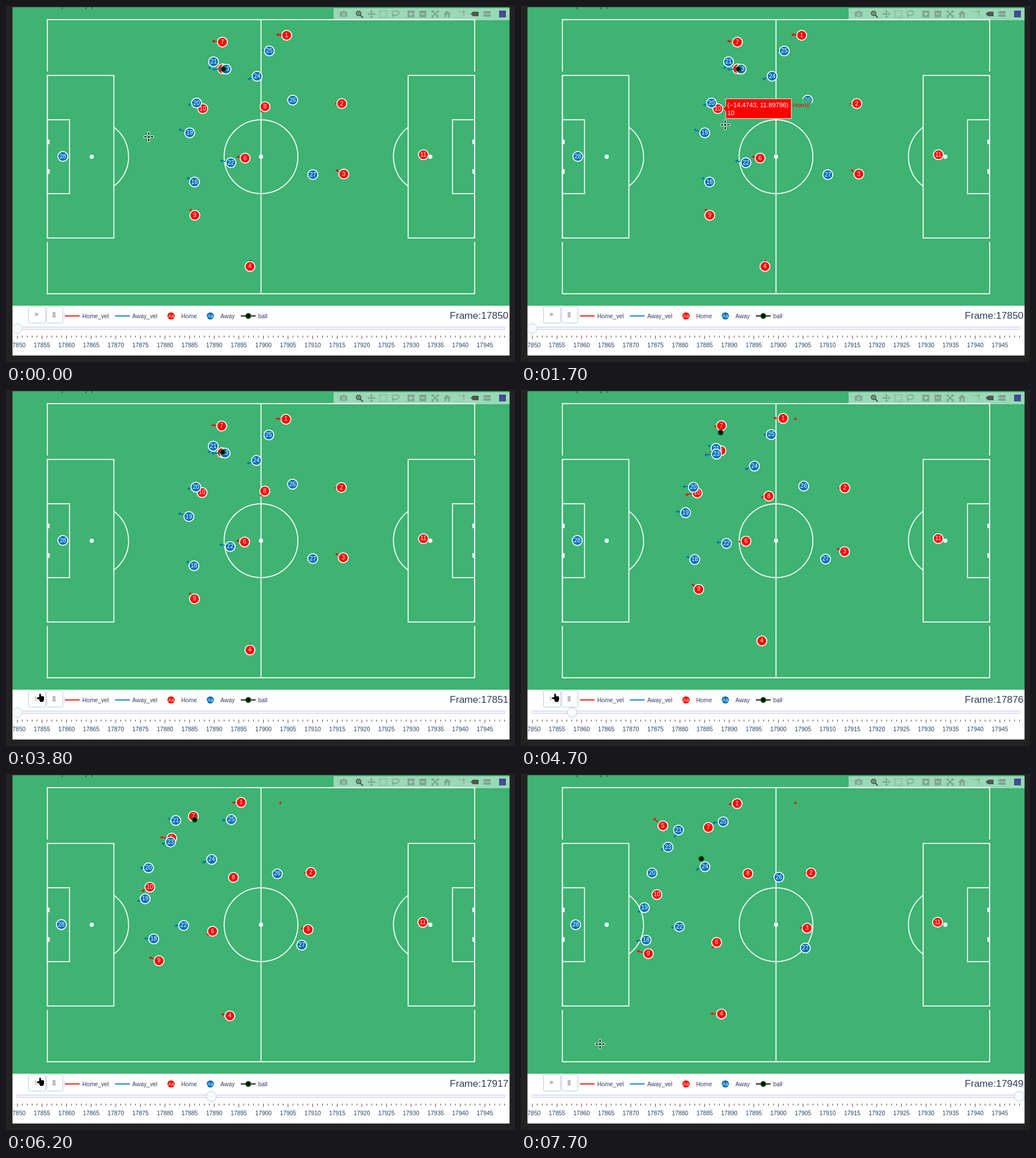
These frames come from a looping animation (895 by 626 pixels, 8000 ms). An HTML page with a canvas:

```html
<!DOCTYPE html>
<html lang="en">
<head>
<meta charset="utf-8">
<title>Match tracking</title>
<style>
html, body { margin: 0; width: 100%; height: 100%; overflow: hidden; background: #222; }
canvas { display: block; width: 895px; height: 626px; }
</style>
</head>
<body>
<canvas id="stage" width="895" height="626"></canvas>
<script>
const ctx = document.getElementById('stage').getContext('2d');
const LOOP = 8000, FIRST = 17850, SPAN = 99;
const RED = '#f00', BLUE = '#0070b9', GREEN = '#3eb372', INK = '#2a3f5f', RIM = '#bec8d9';
const FONT = '"Liberation Sans", Arial, sans-serif';
const LEFT = 11.4, WIDTH = 874, MID_X = 448.4, MID_Y = 265, METRE = 7.089;
const SIDES = [[1, 0], [-1, 0], [0, 1], [0, -1]];

// Each run is a polynomial through a few x, y points evenly spaced in time
const home = [
  [493.5, 51.5, 433, 49.5, 380, 52],
  [590.5, 171.5, 510, 174],
  [594, 295.5, 547, 277, 503, 271],
  [429, 458, 409.5, 430.5, 352.5, 422],
  [381, 110.5, 342, 108, 293, 113, 249.5, 91],
  [420.5, 267.5, 376, 270, 344, 296],
  [380.5, 63.5, 336, 67.5, 329.5, 94],
  [455.5, 177, 429, 187, 400.5, 182, 399, 175],
  [332, 368, 289.5, 337, 224, 316],
  [346, 180.5, 299, 183, 254, 198.5, 239, 212],
  [734, 261.5, 732.5, 260.5]
];
const away = [
  [331.5, 309.5, 280, 292, 220, 292],
  [323, 223, 262.5, 215.5, 217, 235],
  [335, 170.5, 293.5, 170, 251.5, 165, 230.5, 174],
  [365, 98, 335.5, 99.5, 299.5, 82, 277, 98.5],
  [395.5, 275.5, 332.5, 267, 278.5, 268.5],
  [387, 111, 310.5, 116, 258.5, 128.5],
  [441.5, 123.5, 323.5, 163],
  [463, 79, 416, 79, 355.5, 84],
  [504, 165.5, 487, 172.5, 453.5, 181.5],
  [539.5, 296.5, 528, 299, 500, 306],
  [100, 264.5, 96, 265]
];
const ball = [382.5, 111, 346, 70, 332, 79, 317, 149];

// Timelines: [ms, value...]
const knobKeys = [[3800, 20], [4700, 90], [5500, 221], [6200, 361], [7500, 865], [7700, 876]];
const cursorKeys = [[200, 251, 230], [1100, 355, 188], [1300, 357, 197], [1600, 357, 197],
  [1700, 359, 209], [1900, 406, 257], [2300, 284, 344], [2400, 318, 318], [2800, 318, 318],
  [3300, 60, 541], [6500, 60, 541], [6700, 83, 445], [7700, 139, 475]];
const hovers = [[0], [600, 19, '(−17.7431, 5.91327)'], [900, 10, '(−14.4743, 11.89796)'], [1800],
  [1900, 6, '(−3.91752, −0.34619)'], [2100], [2300, 18, '(−16.5463, −6.24873)'], [2900]];

function at(keys, t, col = 1) {
  const i = keys.findIndex(k => k[0] >= t);
  if (i < 0) return keys[keys.length - 1][col];
  if (i === 0) return keys[0][col];
  const a = keys[i - 1], b = keys[i];
  return a[col] + (b[col] - a[col]) * (t - a[0]) / (b[0] - a[0]);
}

function place(path, f) {
  const n = path.length / 2, s = f / SPAN * (n - 1);
  let x = 0, y = 0;
  for (let i = 0; i < n; i++) {
    let w = 1;
    for (let j = 0; j < n; j++) if (j !== i) w *= (s - j) / (i - j);
    x += w * path[2 * i];
    y += w * path[2 * i + 1];
  }
  return { x, y };
}

function box(x, y, w, h, fill) {
  ctx.fillStyle = fill;
  ctx.fillRect(x, y, w, h);
}

function text(s, x, y, size = 10.4, fill = INK, align = 'left') {
  ctx.font = size + 'px ' + FONT;
  ctx.fillStyle = fill;
  ctx.textAlign = align;
  ctx.fillText(s, x, y);
}

function line(color, width, ...pts) {
  ctx.strokeStyle = color;
  ctx.lineWidth = width;
  ctx.beginPath();
  for (let i = 0; i < pts.length; i += 2) ctx.lineTo(pts[i], pts[i + 1]);
  ctx.stroke();
}

function poly(fill, ...pts) {
  ctx.fillStyle = fill;
  ctx.beginPath();
  for (let i = 0; i < pts.length; i += 2) ctx.lineTo(pts[i], pts[i + 1]);
  ctx.closePath();
  ctx.fill();
}

function disc(x, y, r, fill, rim, width) {
  ctx.beginPath();
  ctx.arc(x, y, r, 0, 7);
  ctx.fillStyle = fill;
  ctx.fill();
  if (!rim) return;
  ctx.strokeStyle = rim;
  ctx.lineWidth = width;
  ctx.stroke();
}

function arc(x, y, r, from, to) {
  ctx.beginPath();
  ctx.arc(x, y, r, from, to);
  ctx.stroke();
}

function panel(x, y, w, h, fill) {
  ctx.beginPath();
  ctx.roundRect(x, y, w, h, 2);
  ctx.fillStyle = fill;
  ctx.fill();
  ctx.strokeStyle = RIM;
  ctx.lineWidth = 1;
  ctx.stroke();
}

function pitch() {
  box(0, 0, 895, 626, '#222');
  box(LEFT, 2, WIDTH, 525, GREEN);
  text('[', 97, 2, 12, '#1c3330');
  text(']', 139, 2, 12, '#1c3330');
  text('p', 150, 2, 12, '#1c3330');

  const halfW = 53 * METRE, halfH = 34 * METRE, ring = 9.15 * METRE;
  ctx.strokeStyle = '#fff';
  ctx.lineWidth = 1.75;
  ctx.strokeRect(MID_X - halfW, MID_Y - halfH, 2 * halfW, 2 * halfH);
  line('#fff', 1.75, MID_X, MID_Y - halfH, MID_X, MID_Y + halfH);
  arc(MID_X, MID_Y, ring, 0, 7);
  disc(MID_X, MID_Y, 3.7, '#fff');
  const bend = Math.acos(5.5 / 9.15);
  [1, -1].forEach(s => {
    const x = MID_X - s * halfW, spot = x + 11 * METRE * s, turn = s > 0 ? 0 : Math.PI;
    [-1, 1].forEach(v => box(x - 1.5, MID_Y + v * 146.5 - 3.2, 3, 6.4, GREEN));
    [[16.5, 40.32], [5.5, 18.32]].forEach(([w, h]) =>
      ctx.strokeRect(x, MID_Y - h / 2 * METRE, w * METRE * s, h * METRE));
    arc(spot, MID_Y, ring, turn - bend, turn + bend);
    disc(spot, MID_Y, 3.7, '#fff');
    [-1, 1].forEach(v => box(s > 0 ? x : x - 4, MID_Y + v * 26 - 4, 4, 8, '#fff'));
  });
}

function toolbar() {
  box(576, 4, LEFT + WIDTH - 576, 21, 'rgba(255,255,255,.48)');
  const dim = 'rgba(68,68,68,.34)', lit = 'rgba(60,60,60,.82)', pale = '#a4dcbd', y = 14;
  // camera
  box(587, 10, 13, 9, dim);
  box(591, 8.5, 5, 1.5, dim);
  disc(593.5, 14.5, 2.8, pale);
  disc(593.5, 14.5, 1.6, dim);
  // zoom
  disc(620, 13, 3.8, 'transparent', lit, 2);
  line(lit, 2.4, 623, 16, 627.5, 20.5);
  line(lit, 1.2, 618, 13, 622, 13);
  line(lit, 1.2, 620, 11, 620, 15);
  // pan
  SIDES.forEach(([a, b]) => {
    line(dim, 1.6, 642.5, y, 642.5 + 5 * a, y + 5 * b);
    poly(dim, 642.5 + 7 * a, y + 7 * b,
      642.5 + 4 * a - 2.6 * b, y + 4 * b + 2.6 * a,
      642.5 + 4 * a + 2.6 * b, y + 4 * b - 2.6 * a);
  });
  // box select
  ctx.setLineDash([2, 1.7]);
  ctx.strokeStyle = dim;
  ctx.strokeRect(657.5, 8.5, 12, 11.5);
  ctx.setLineDash([]);
  // lasso
  ctx.beginPath();
  ctx.ellipse(684.8, 12.5, 6, 4, -.15, 0, 7);
  ctx.stroke();
  line(dim, 1.5, 681, 15.5, 679.5, 18, 682, 20);
  // zoom in, zoom out
  [712, 733].forEach((x, i) => {
    box(x - 6, 8, 12, 12, dim);
    line(pale, 1.8, x - 3.5, y, x + 3.5, y);
    if (!i) line(pale, 1.8, x, 10.5, x, 17.5);
  });
  // autoscale
  [-1, 1].forEach(a => [-1, 1].forEach(b => {
    const x = 754.5 + 5.5 * a, v = y + 5.5 * b;
    line(dim, 1.6, x - 3.5 * a, v, x, v, x, v - 3.5 * b);
    line(dim, 1.8, 754.5, y, x - a, v - b);
  }));
  // reset
  poly(dim, 768.5, 14.5, 775.5, 8, 782.5, 14.5);
  box(771, 14.5, 3.2, 5.5, dim);
  box(777, 14.5, 3.2, 5.5, dim);
  // spikes
  ctx.setLineDash([2, 1.5]);
  line(dim, 1.5, 796, 10, 804, 10);
  line(dim, 1.5, 805, 12, 805, 20);
  ctx.setLineDash([]);
  disc(805, 10, 1.7, dim);
  // hover modes
  poly(lit, 817, y, 821, 10, 831, 10, 831, 18, 821, 18);
  [9, 14.7].forEach(v => poly(dim, 838.5, v + 2.2, 841, v, 852, v, 852, v + 4.4, 841, v + 4.4));
  box(867, 8, 12, 12, '#3f4f8c');
}

function legendDot(x, color, label) {
  disc(x, 545, 6.3, color);
  text('Aa', x, 548, 8.5, '#fff', 'center');
  text(label, x + 17.7, 549);
}

function legendLine(x, color, label) {
  line(color, 1.75, x, 545, x + 26, 545);
  text(label, x + 30.4, 549);
}

function ballMark(x, y) {
  disc(x, y, 4.4, '#0a0a0a', '#0b6b1f', 1.75);
}

function button(x, w, label) {
  panel(x, 528.5, w, 29, '#fff');
  text(label, x + w / 2 - 1.3, 546, 10.4, INK, 'center');
}

function controls(frame, knob) {
  box(LEFT, 527, WIDTH, 87.6, '#fff');
  button(39.5, 30, '>');
  button(71.5, 28.5, '||');
  legendLine(103.5, RED, 'Home_vel');
  legendLine(191.5, BLUE, 'Away_vel');
  legendDot(290.3, RED, 'Home');
  legendDot(359.3, BLUE, 'Away');
  legendLine(413, '#000', 'ball');
  ballMark(426, 545);
  text('Frame:' + (FIRST + frame), 883.5, 550, 17.35, INK, 'right');

  panel(18.5, 564.5, 860, 4, '#f8fafc');
  ctx.save();
  ctx.beginPath();
  ctx.rect(LEFT, 527, WIDTH, 88);
  ctx.clip();
  for (let i = 0; i <= SPAN; i++) {
    const x = 20 + i * 8.653, major = i % 5 === 0;
    box(x - .45, 579.5, .9, major ? 6 : 3.5, '#333');
    if (major) text(FIRST + i, x, 600, 10.4, INK, 'center');
  }
  disc(knob, 567, 8.7, '#f8fafc', RIM, 1);
  ctx.restore();
}

function arrowHead(x, y, color) {
  poly(color, x - 2.5, y, x + 2, y - 2.7, x + 2, y + 2.7);
}

function team(paths, first, color, f) {
  const g = Math.min(f, 90);
  paths.forEach(path => {
    // where the run leads in half a second
    const { x, y } = place(path, f), a = place(path, g - 1), b = place(path, g + 1);
    const tx = x + (b.x - a.x) * 6.2, ty = y + (b.y - a.y) * 6.2;
    line(color, 1.75, x, y, tx, ty);
    arrowHead(tx, ty, color);
  });
  paths.forEach((path, i) => {
    const { x, y } = place(path, f);
    disc(x, y, 8.7, color, '#fff', 1.75);
    text(first + i, x, y + 3, 10.4, '#fff', 'center');
  });
}

function tooltip(id, label) {
  const isHome = id < 18, color = isHome ? RED : BLUE, name = isHome ? 'Home' : 'Away';
  const [px, py] = isHome ? home[id - 1] : away[id - 18];
  const x = px + 14, size = 11.3;
  ctx.font = size + 'px ' + FONT;
  const w = ctx.measureText(label).width + 7.8, nw = ctx.measureText(name).width;
  box(x + w, py - 17, nw + 5.5, 18, 'rgba(62,179,114,.8)');
  text(name, x + w + 2.5, py - 2.8, size, color);
  panelTip(x, py, w, color);
  text(label, x + 2.8, py - 2.8, size, '#fff');
  text(id, x + 2.8, py + 11.3, size, '#fff');
}

function panelTip(x, y, w, color) {
  const h = 17.3;
  poly(color, x - 5, y, x, y - 5, x, y - h, x + w, y - h, x + w, y + h, x, y + h, x, y + 5);
  ctx.strokeStyle = '#fff';
  ctx.lineWidth = .9;
  ctx.stroke();
}

function crosshair(x, y) {
  [['#fff', 4, 2.6, 9], ['#000', 2, 3.6, 8]].forEach(([color, w, from, to]) =>
    SIDES.forEach(([a, b]) => line(color, w, x + from * a, y + from * b, x + to * a, y + to * b)));
  box(x - 1, y - 1, 2, 2, '#000');
}

function hand(x, y) {
  const parts = [[-1.5, -7, 3, 9], [-1.5, -2.5, 8.3, 8], [-.5, 4, 6.3, 3.5], [-5.5, -.8, 5, 3.4]];
  [['#fff', .9], ['#000', 0]].forEach(([color, grow]) => parts.forEach(([a, b, w, h]) => {
    ctx.beginPath();
    ctx.roundRect(x + a - grow, y + b - grow, w + 2 * grow, h + 2 * grow, 1.5);
    ctx.fillStyle = color;
    ctx.fill();
  }));
}

function draw(now) {
  let t = Math.floor(now % LOOP / 100) * 100;
  // playback stutters near the end
  if (t > 6400 && t < 7500 && t % 300 === 200) t -= 100;
  const f = t < 3800 ? 0 : Math.min(SPAN, Math.floor(1 + (t - 3800) * .0279));
  pitch();
  arrowHead(482, 50.7, RED);
  team(home, 1, RED, f);
  team(away, 18, BLUE, f);
  const { x, y } = place(ball, f);
  ballMark(x, y);
  toolbar();
  controls(f, at(knobKeys, t));
  const [, id, label] = hovers.filter(h => h[0] <= t).pop();
  if (id) tooltip(id, label);
  const cx = at(cursorKeys, t), cy = at(cursorKeys, t, 2);
  (cy > 527 ? hand : crosshair)(cx, cy);
}

const start = performance.now();
function tick() {
  draw(performance.now() - start);
  requestAnimationFrame(tick);
}
tick();
</script>
</body>
</html>
```
